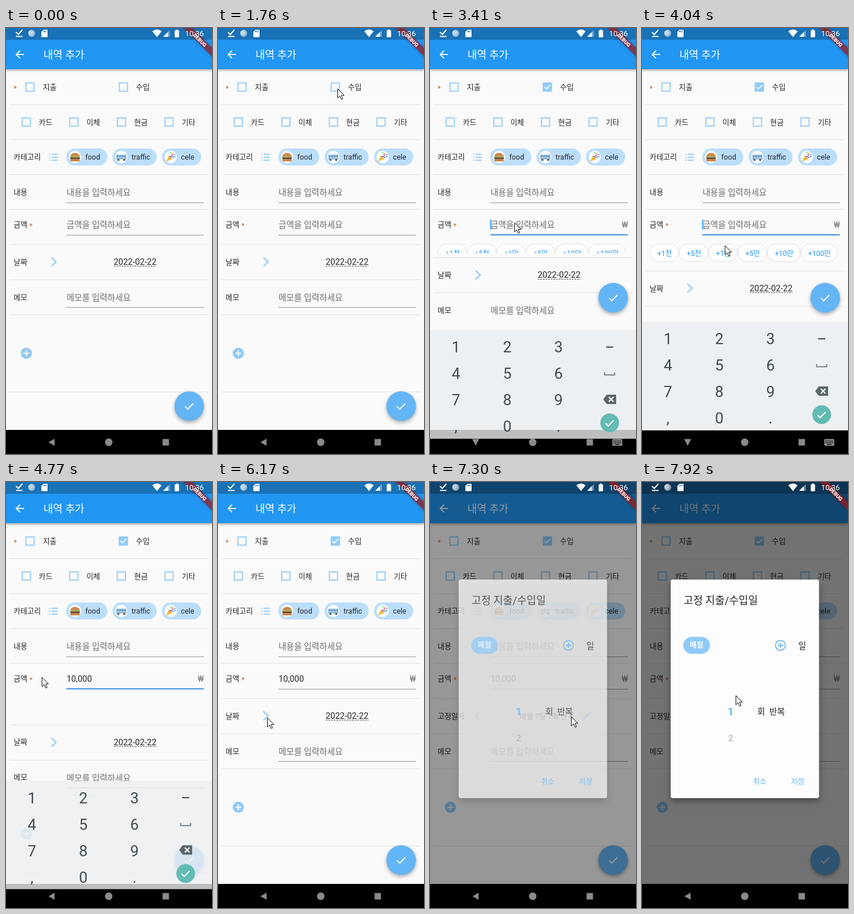
An HTML page with a canvas for the animation above (8 s loop, 352 by 725 pixels).

```html
<!DOCTYPE html>
<html lang="ko">
<head>
<meta charset="utf-8">
<title>내역 추가</title>
<style>
html, body { margin: 0; width: 100%; height: 100%; overflow: hidden; background: #fafafa; }
canvas { display: block; width: 352px; height: 725px; }
</style>
</head>
<body>
<canvas id="stage"></canvas>
<script>
const W = 352, H = 725, LOOP = 8000;
const FONT = 'Roboto, "Noto Sans CJK KR", "Noto Sans CJK", sans-serif';
const SKY = '#90caf9', BLUE = '#2196f3', MID = '#64b5f6', INK = '#262626', HINT = '#6c6c6c';
const RULE = '#999', STAR = '#c4713a';
const canvas = document.getElementById('stage');
const c = canvas.getContext('2d');
const dpr = window.devicePixelRatio || 1;
canvas.width = W * dpr;
canvas.height = H * dpr;

// The screen refreshes on a coarse, even beat
const BEGIN = 758, BEAT = 125.2;
const CHECK = 1880, FOCUS = 3250, TYPED = 4130, BLUR = 4630, FIXED = 6390;

// Pointer moves: start, end, x, y
const MOVES = [
  [758, 1380, 220, 135], [1380, 1750, 204, 103], [2010, 2780, 149, 310], [2780, 3030, 144, 331],
  [3660, 4130, 141, 377], [4130, 4510, 61, 332], [4770, 5260, 205, 502],
  [5260, 5780, 117, 404], [5780, 6140, 84, 401], [6390, 6890, 241, 399], [7800, 7890, 160, 363]
];

const snap = t => t < BEGIN ? 0 : BEGIN + Math.floor((t - BEGIN) / BEAT) * BEAT;
const span = (t, a, b) => Math.min(1, Math.max(0, (t - a) / (b - a)));
const smooth = u => u * u * (3 - 2 * u);
const easeOut = u => 1 - (1 - u) * (1 - u);

const growth = s => 45 * (span(s, 3160, 3620) - span(s, 4764, 5010));

function text(str, x, y, size, color = INK, align = 'left', weight = 400) {
  c.font = `${weight} ${size}px ${FONT}`;
  c.textAlign = align;
  c.fillStyle = color;
  c.fillText(str, x, y + size * .36);
}
function rect(x, y, w, h, color) { c.fillStyle = color; c.fillRect(x, y, w, h); }
function pill(x, y, w, h, r, fill, stroke) {
  c.beginPath();
  c.roundRect(x, y, w, h, r);
  if (fill) { c.fillStyle = fill; c.fill(); }
  if (stroke) { c.strokeStyle = stroke; c.lineWidth = 1; c.stroke(); }
}
function disc(x, y, r, color) {
  c.beginPath();
  c.arc(x, y, r, 0, 7);
  c.fillStyle = color;
  c.fill();
}
function path(pts) {
  c.beginPath();
  for (let i = 0; i < pts.length; i += 2) c.lineTo(pts[i], pts[i + 1]);
}
function line(pts, color, width) {
  path(pts);
  c.strokeStyle = color;
  c.lineWidth = width;
  c.stroke();
}
function shape(pts, color) { path(pts); c.fillStyle = color; c.fill(); }
function clip(x, y, w, h) { c.beginPath(); c.rect(x, y, w, h); c.clip(); }
function shadow(color, blur, dy) { c.shadowColor = color; c.shadowBlur = blur * dpr; c.shadowOffsetY = dy * dpr; }
function noShadow() { shadow('transparent', 0, 0); }
function plus(x, y, r, color) { line([x - r, y, x + r, y], color, 2); line([x, y - r, x, y + r], color, 2); }
function tick(x, y, k, color, w) { line([x - 7 * k, y, x - 2.5 * k, y + 4.7 * k, x + 7 * k, y - 5 * k], color, w); }
function chevron(x, y, dir) { line([x - 4 * dir, y - 7.5, x + 4 * dir, y, x - 4 * dir, y + 7.5], SKY, 2.1); }
function divider(y) { rect(6, y - .5, 340, 1, '#e4e4e4'); }

function box(x, y, on = 0) {
  c.strokeStyle = SKY;
  c.lineWidth = 1.8;
  c.strokeRect(x - 7, y - 7, 14, 14);
  if (!on) return;
  c.globalAlpha = on;
  rect(x - 7.5, y - 7.5, 15, 15, SKY);
  tick(x, y, .7, '#fff', 1.8);
  c.globalAlpha = 1;
}

function field(hint, y, value) {
  text(value || hint, 103.5, y, 14.4, value ? INK : HINT);
}

function burger(x, y) {
  c.beginPath();
  c.ellipse(x, y - 1, 8, 6, 0, Math.PI, 0);
  c.fillStyle = '#cf8a48';
  c.fill();
  rect(x - 8.5, y - 1, 17, 2, '#8ba545');
  rect(x - 8, y + 1, 16, 3, '#6b3f2a');
  pill(x - 8, y + 4, 16, 3.5, 1.6, '#c98545');
}
function bus(x, y) {
  pill(x - 9, y - 4.5, 18, 9.5, 1.5, '#c9dbe6');
  for (let i = 0; i < 4; i++) rect(x - 8 + i * 4.2, y - 3, 3.4, 3.6, '#5b9bd0');
  rect(x - 9, y + 2, 18, 1.3, '#7fa5c0');
  for (const d of [-5, 5]) disc(x + d, y + 5, 1.8, '#455a64');
}
function popper(x, y) {
  shape([x - 8, y + 8, x - 3, y - 3, x + 3, y + 3], '#f2b83c');
  line([x, y, x + 3, y - 3, x + 2, y - 7], '#d9534f', 1.4);
  line([x + 2, y + 1, x + 8, y - 1], '#4a90d9', 1.4);
  for (let i = 0; i < 5; i++)
    disc(x + 5 * Math.cos(i * 2.1) + 2, y - 4 + 4 * Math.sin(i * 2.1), 1.1, `hsl(${i * 72 + 340} 70% 58%)`);
}

function chip(x, w, label, icon) {
  pill(x, 205, w, 29, 14.5, '#bbdefb');
  disc(x + 15, 219.5, 10.5, '#fff');
  icon(x + 15, 219.5);
  text(label, x + 32.5, 220, 12.4);
}

function quickAmounts(height) {
  c.save();
  clip(0, 354, W, height);
  let x = 13.5;
  for (const label of ['+1천', '+5천', '+1만', '+5만', '+10만', '+100만']) {
    const w = 50.2 + (label.length - 3) * 6.8;
    pill(x, 367.5, w - 1, 30, 15, '#fff', '#dedede');
    text(label, x + w / 2, 383.2, 12.2, BLUE, 'center');
    x += w;
  }
  c.restore();
}

function form(s) {
  const grow = growth(s), asking = s >= FOCUS && s < BLUR;
  const active = s >= FOCUS && s < 5000, typed = s >= TYPED, fixed = s >= FIXED;
  c.save();
  clip(0, 70, W, (asking ? 495 : 684) - 70);

  text('*', 13, 102, 12.7, STAR);
  box(41, 100.5);
  text('지출', 63, 100.5, 12.7);
  box(200.5, 100.5, span(s, CHECK - 100, CHECK + 120));
  text('수입', 222, 100.5, 12.7);
  divider(130.5);
  ['카드', '이체', '현금', '기타'].forEach((name, i) => {
    box(34.7 + i * 81.3, 160);
    text(name, 56 + i * 81.4, 160, 12.7);
  });
  divider(190);

  text('카테고리', 13, 219.5, 12.7);
  for (let i = 0; i < 3; i++) {
    rect(74, 214 + i * 5, 2, 1.8, SKY);
    rect(78, 214 + i * 5, 10.5, 1.8, SKY);
  }
  chip(103, 70, 'food', burger);
  chip(182, 75.5, 'traffic', bus);
  chip(266.5, 67, 'cele', popper);
  divider(249.5);

  text('내용', 13, 279, 12.7);
  field('내용을 입력하세요', 279.5);
  rect(103, 297, 235, 1, RULE);
  divider(308.5);

  text('금액', 13, 334, 12.7);
  text('*', 40, 336, 12.7, STAR);
  field('금액을 입력하세요', 334.5, typed && '10,000');
  if (active || typed) text('₩', 338, 335, 14, '#777', 'right');
  if (active) rect(103, 351, 235, 2, '#4196e4');
  else rect(103, 352, 235, 1, RULE);
  if (asking) {
    rect(typed ? 147.5 : 103, 326, 1.7, 17, BLUE);
    quickAmounts(grow + 7);
  }

  c.translate(0, grow);
  divider(368.5);
  text(fixed ? '고정일자' : '날짜', 13, 398, 12.7);
  chevron(81.7, 398, fixed ? -1 : 1);
  if (fixed) {
    text('매월 ?일 1회 반복', 200, 398, 12.9, INK, 'center');
    shape([260, 405.5, 260, 401.5, 269.5, 392, 273.5, 396, 264, 405.5], SKY);
    shape([270.5, 391, 272, 389.8, 275.5, 393.5, 274.5, 395], SKY);
  } else {
    text('2022-02-22', 220.5, 398, 14.5, INK, 'center');
    c.setLineDash([3, 1.5]);
    line([184, 405.2, 257, 405.2], '#444', 1);
    c.setLineDash([]);
  }
  divider(428.5);
  text('메모', 13, 458, 12.7);
  field('메모를 입력하세요', 458.5);
  rect(103, 475, 235, 1, RULE);
  divider(488);
  disc(34.8, 553.5, 9.6, SKY);
  plus(34.8, 553.5, 5, '#fafafa');
  divider(619.5);
  c.restore();
}

function fab(s) {
  const y = 643.5 - (s < BLUR ? 184.5 * span(s, FOCUS - 60, 3380) : 0);
  shadow('rgba(0,0,0,.32)', 6, 3);
  disc(313, y, 25.3, MID);
  noShadow();
  tick(313, y + .5, 1, '#fff', 1.8);
}

function nav(s) {
  const g = '#8a8a8a';
  rect(0, 684, W, 41, '#000');
  if (s >= FOCUS && s < BLUR) {
    shape([72, 699.5, 84, 699.5, 78, 711], g);
    pill(311.5, 699.5, 17, 11.5, 1.5, g);
    for (let i = 0; i < 10; i++) rect(313.5 + i % 5 * 2.8, 702 + (i > 4 ? 3 : 0), 1.6, 1.6, '#000');
    rect(316.5, 708, 7, 1.3, '#000');
  } else shape([83, 699, 83, 711, 72.5, 705], g);
  disc(175.5, 705, 6.4, g);
  rect(267.5, 699.5, 11, 11, g);
}

function keyboard(s) {
  const rise = easeOut(span(s, 3160, 3600)), fall = span(s, 4600, 5000);
  const off = 60 * (1 - rise) + 20 * fall;
  const alpha = span(s, 3160, 3340) * (1 - fall * fall);
  if (!alpha) return;
  const ink = '#3f4a50', top = 529 + off;
  c.save();
  clip(0, 500 + off, W, 185);
  c.globalAlpha = alpha;
  rect(0, 500 + off, W, 184, '#edf0f2');
  rect(0, 684, W, off + 1, '#bcbec0');
  c.globalAlpha = Math.min(1, alpha * 1.2);
  ['123', '456', '789', ',0.'].forEach((row, r) =>
    [...row].forEach((k, i) => text(k, 44.4 + i * 87.6, top + r * 45, 26, ink, 'center')));
  rect(301, top - 1, 12, 2, ink);
  line([298.5, top + 43, 298.5, top + 47.5, 315.5, top + 47.5, 315.5, top + 43], '#7c868b', 2);
  const y = top + 89;
  shape([296, y, 302, y - 8, 318, y - 8, 318, y + 8, 302, y + 8], '#5b666c');
  for (const d of [-4, 4]) line([305.5, y - d, 313.5, y + d], '#fff', 2);
  disc(307, top + 129, 16, '#62bcb3');
  tick(307, top + 129.5, 1, '#fff', 2);
  c.restore();
}

function appBar() {
  shadow('rgba(0,0,0,.35)', 4, 2);
  rect(0, 0, W, 70, BLUE);
  noShadow();
  rect(0, 0, W, 20, '#1971b6');
  line([31, 45, 18, 45], '#fff', 1.8);
  line([24, 38.5, 17.5, 45, 24, 51.5], '#fff', 1.8);
  text('내역 추가', 64, 45.5, 17.8, '#fff', 'left', 500);
}

function dialog(s) {
  const alpha = easeOut(span(s, 7100, 7450));
  if (!alpha) return;
  rect(0, 0, W, 684, `rgba(0,0,0,${.54 * alpha})`);
  c.globalAlpha = alpha;
  shadow(`rgba(0,0,0,${.35 * alpha * alpha})`, 12, 6);
  pill(49, 166, 253.5, 372, 3.5, '#fdfdfd');
  noShadow();
  text('고정 지출/수입일', 71, 202, 17.9);
  pill(70.5, 263.5, 45.5, 29, 14.5, SKY);
  text('매월', 93.2, 278, 12.4, '#fff', 'center', 700);
  c.beginPath();
  c.arc(236.5, 278, 8.4, 0, 7);
  c.strokeStyle = MID;
  c.lineWidth = 1.6;
  c.stroke();
  plus(236.5, 278, 4.5, MID);
  text('일', 267, 278.5, 14.5);
  text('1', 151.5, 391, 18, MID, 'center', 700);
  text('2', 151.5, 436, 14.5, '#a6a6a6', 'center');
  text('회', 197, 391, 14.5);
  text('반복', 217.5, 391, 14.5);
  text('취소', 201.3, 509, 12.6, MID, 'center', 500);
  text('저장', 266, 509, 12.6, MID, 'center', 500);
  c.globalAlpha = 1;
}

function status() {
  const w = '#fff';
  c.save();
  c.translate(W, 0);
  c.rotate(Math.PI / 4);
  shadow('rgba(0,0,0,.5)', 5, 0);
  rect(-40, 24, 80, 10.3, 'rgba(183,28,28,.63)');
  noShadow();
  text('DEBUG', 0, 29.2, 8.7, w, 'center', 900);
  c.restore();

  line([17, 7, 21, 11, 28, 3], w, 1.9);
  rect(17, 13.5, 11.5, 1.8, w);
  disc(43.8, 9, 6, 'rgba(255,255,255,.55)');
  disc(42.6, 8, 4.2, 'rgba(255,255,255,.4)');
  shape([60.5, 6.5, 64, 3, 71, 3, 71, 15.5, 60.5, 15.5], w);
  for (let i = 0; i < 3; i++) rect(63.5 + i * 2.3, 4.5, 1.2, 2.8, '#1971b6');
  c.beginPath();
  c.moveTo(258, 15.5);
  c.lineTo(250, 5.5);
  c.quadraticCurveTo(258, -.5, 266, 5.5);
  c.fillStyle = w;
  c.fill();
  shape([268.5, 15, 280, 15, 280, 3.5], 'rgba(255,255,255,.4)');
  shape([268.5, 15, 276.5, 15, 276.5, 7], w);
  pill(288.3, 4, 7.4, 11.7, 1, w);
  rect(290.3, 2.7, 3.4, 2, w);
  text('10:36', 306, 9.7, 12.9, w);
}

function pointer(s) {
  if (s < BEGIN) return;
  let x = 335, y = 712;
  for (const [a, b, toX, toY] of MOVES) {
    const u = smooth(span(s, a, b));
    x += (toX - x) * u;
    y += (toY - y) * u;
  }
  c.save();
  c.translate(x + .5, y + .5);
  path([0, 0, 0, 15.5, 3.7, 12.2, 6.4, 18, 8.7, 17, 6.2, 11.3, 11, 11]);
  c.closePath();
  c.fillStyle = '#fff';
  c.fill();
  c.strokeStyle = '#111';
  c.lineWidth = 1;
  c.stroke();
  c.restore();
}

function draw(t) {
  const s = snap(t);
  c.setTransform(dpr, 0, 0, dpr, 0, 0);
  rect(0, 0, W, H, '#fafafa');
  form(s);
  fab(s);
  nav(s);
  keyboard(s);
  appBar();
  dialog(s);
  status();
  pointer(s);
}

const start = performance.now();
function run() {
  draw((performance.now() - start) % LOOP);
  requestAnimationFrame(run);
}
run();
</script>
</body>
</html>
```
